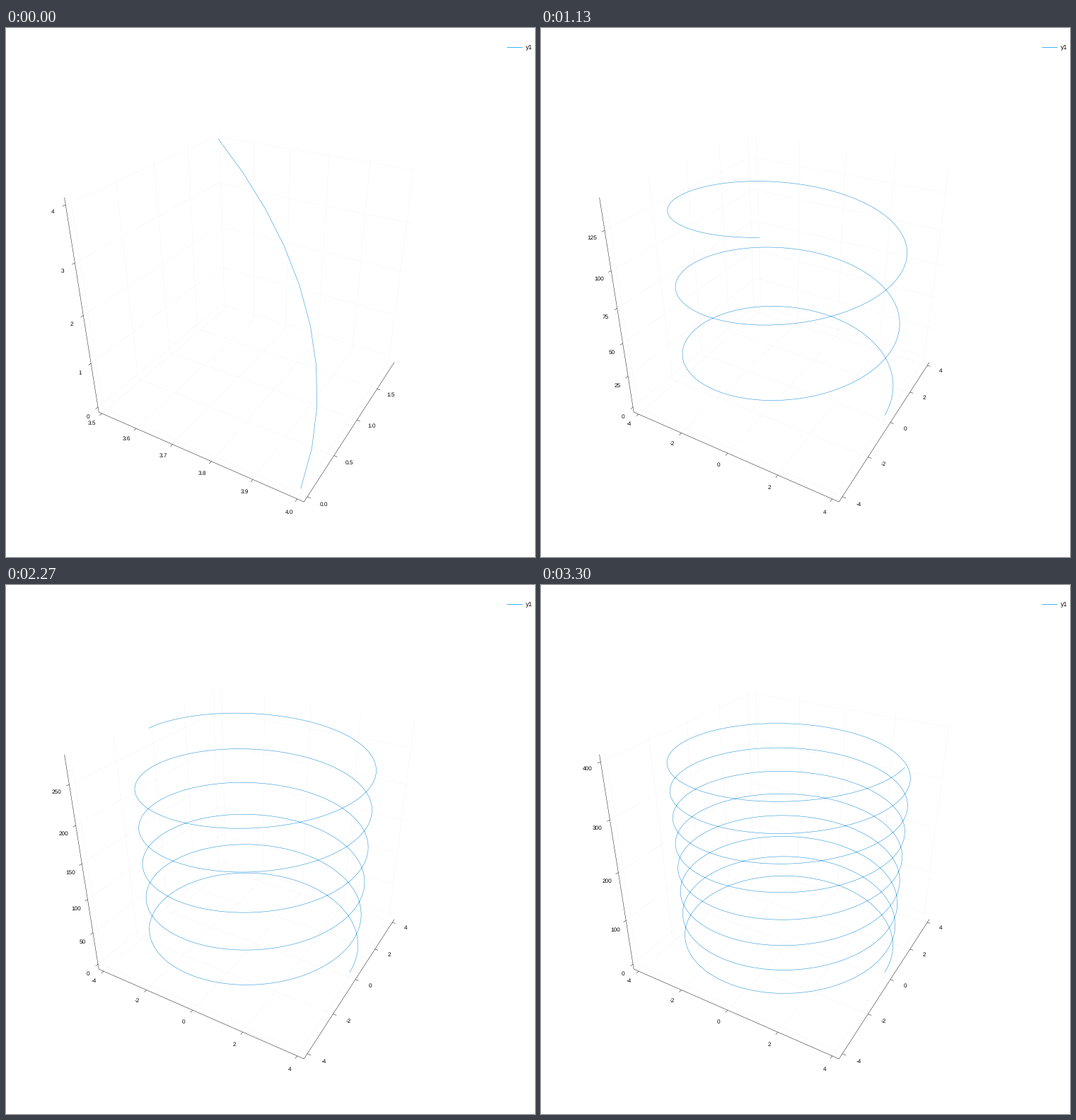
A matplotlib script for the animation above (3330 ms loop, 748 px wide and 748 px high).

```python
import math

import matplotlib.pyplot as plt
import numpy as np
from matplotlib.animation import FuncAnimation
from matplotlib.collections import LineCollection

SIZE, DPI = 748, 64
PX = 72 / DPI                      # points per pixel
TICK_MS, LOOP_MS = 10, 3330
STEP_COUNT, STEP_MS = 100, 100 / 3  # steps start on the nearest 10 ms
CURVE_BLUE, LEGEND_BLUE = "#0A86D4", "#009AF9"

# Camera looking at the cube [-1, 1]^3
AZIM, ELEV = math.radians(30), math.radians(30)
DIST, FOCAL = 5.35, 892
CENTER = np.array([351.4, 374.0])
TO_CAMERA = np.array([math.cos(ELEV) * math.sin(AZIM),
                      -math.cos(ELEV) * math.cos(AZIM),
                      math.sin(ELEV)])
RIGHT = np.array([math.cos(AZIM), math.sin(AZIM), 0])
UP = np.cross(TO_CAMERA, RIGHT)

# Helix
RADIUS, TURNS, HEIGHT = 4, 8, 400
POINTS_PER_STEP = 10

TICK_LEN, LABEL_GAP = 0.03, 0.132
NICE_STEPS = ((1, 1.0), (5, 0.9), (2, 0.7), (2.5, 0.5), (3, 0.2))

plt.rcParams["text.hinting"] = "none"


def project(points):
    p = np.asarray(points, float)
    depth = DIST - p @ TO_CAMERA
    x = CENTER[0] + FOCAL * (p @ RIGHT) / depth
    y = CENTER[1] - FOCAL * (p @ UP) / depth
    return np.stack([x, y], axis=-1)


def helix(n):
    part = n / STEP_COUNT
    t = np.linspace(0, part * TURNS * 2 * math.pi, POINTS_PER_STEP * n)
    z = np.linspace(0, part * HEIGHT, len(t))
    return np.stack([RADIUS * np.cos(t), RADIUS * np.sin(t), z], axis=1)


def nice_ticks(lo, hi):
    """Best scoring round ticks in [lo, hi] and their labels."""
    span = hi - lo
    best, best_score = None, -1
    top = math.floor(math.log10(span))
    for power in range(top - 2, top + 1):
        for q, nice in NICE_STEPS:
            step = q * 10.0 ** power
            first = math.ceil(lo / step - 1e-9)
            last = math.floor(hi / step + 1e-9)
            count = last - first + 1
            if not 4 <= count <= 8:
                continue
            score = (0.25 * (1 - abs(count - 5) / 5)
                     + (first <= 0 <= last) / 6
                     + 0.5 * span / ((count - 1) * step)
                     + 0.25 * nice)
            if score > best_score:
                digits = max(0, -power + (q == 2.5))
                best = np.arange(first, last + 1) * step, digits
                best_score = score
    values, digits = best
    return values, [f"{v + 0.0:.{digits}f}" for v in values]


def grid_path(axis, v):
    """Floor or wall line through tick position v, bent at the back edge."""
    if axis == 0:
        return [(v, -1, -1), (v, 1, -1), (v, 1, 1)]
    if axis == 1:
        return [(1, v, -1), (-1, v, -1), (-1, v, 1)]
    return [(-1, -1, v), (-1, 1, v), (1, 1, v)]


def beside_axis(axis, v, gap):
    """Point at tick position v, moved outward from the axis by gap."""
    return ((v, -1 - gap, -1), (1 + gap, v, -1), (-1, -1 - gap, v))[axis]


fig = plt.figure(figsize=(SIZE / DPI, SIZE / DPI), dpi=DPI, facecolor="white")
ax = fig.add_axes([0, 0, 1, 1])
ax.set_xlim(0, SIZE)
ax.set_ylim(SIZE, 0)
ax.axis("off")


def add_lines(color, width, alpha=1.0, paths=()):
    lines = LineCollection(list(paths), colors=color, linewidths=width * PX,
                           alpha=alpha)
    ax.add_collection(lines, autolim=False)
    return lines


def add_text(x, y, text, size, ha="center"):
    return ax.text(x, y, text, fontsize=size * PX, family="Liberation Sans",
                   color="black", ha=ha, va="center")


grid = add_lines("black", 0.4, 0.05)
add_lines("black", 0.45, paths=[
    project([(-1, -1, 1), (-1, -1, -1), (1, -1, -1), (1, 1, -1)])])
ticks = add_lines("black", 0.45)
curve, = ax.plot([], [], color=CURVE_BLUE, lw=0.48 * PX,
                 solid_joinstyle="round")
labels = [add_text(0, 0, "", 8.2) for _ in range(24)]

ax.plot([708, 730.5], [27, 27], color=LEGEND_BLUE, lw=PX, alpha=0.75,
        solid_capstyle="butt")
add_text(734.5, 27.8, "y1", 9, ha="left")


def show_step(n):
    data = helix(n)
    lo, hi = data.min(axis=0), data.max(axis=0)
    pad = 0.03 * (hi - lo)
    lo, hi = lo - pad, hi + pad

    def scale(v, low, high):
        return 2 * (v - low) / (high - low) - 1

    xy = project(scale(data, lo, hi))
    curve.set_data(xy[:, 0], xy[:, 1])

    grid_paths, tick_paths, marks = [], [], []
    for axis in range(3):
        values, names = nice_ticks(lo[axis], hi[axis])
        for v, name in zip(scale(values, lo[axis], hi[axis]), names):
            grid_paths.append(project(grid_path(axis, v)))
            tick_paths.append(project([beside_axis(axis, v, 0),
                                       beside_axis(axis, v, TICK_LEN)]))
            marks.append((project(beside_axis(axis, v, LABEL_GAP)), name))
    grid.set_segments(grid_paths)
    ticks.set_segments(tick_paths)

    for k, label in enumerate(labels):
        label.set_visible(k < len(marks))
        if k < len(marks):
            (x, y), name = marks[k]
            label.set_position((x + 0.5, y + 1.6))
            label.set_text(name)


def draw(i):
    # Half a tick early rounds each start to the nearest tick
    step = int((i + 0.5) * TICK_MS / STEP_MS)
    show_step(min(step, STEP_COUNT - 1) + 1)
    return [curve, grid, ticks, *labels]


anim = FuncAnimation(fig, draw, frames=LOOP_MS // TICK_MS, interval=TICK_MS,
                     init_func=lambda: draw(0), repeat=True, repeat_delay=0,
                     blit=False)
plt.show()
```
